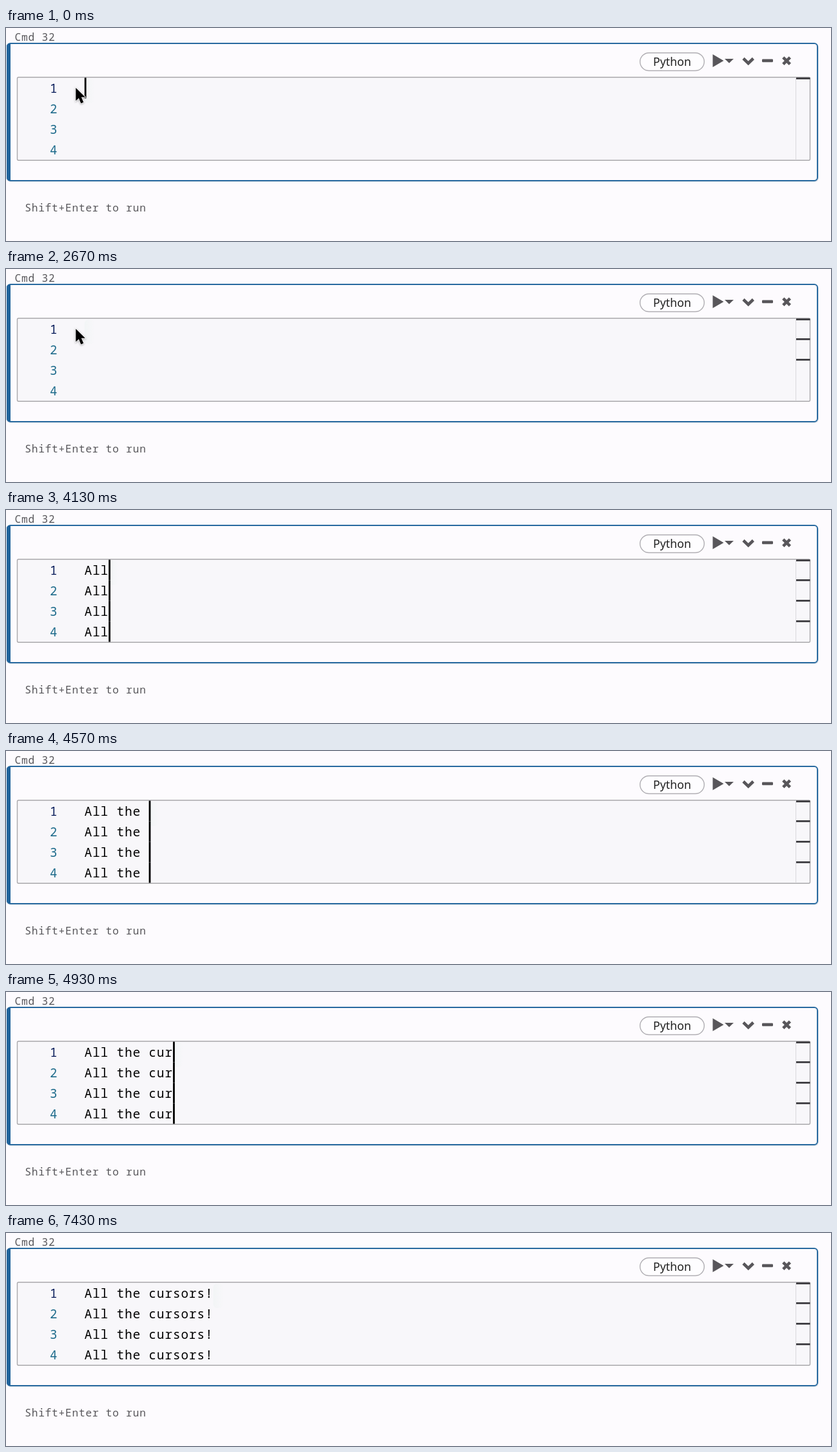
Recreate the animation shown at these times as an HTML page. Size 1280 by 332 pixels, loop 7860 ms.

```html
<!DOCTYPE html>
<html lang="en">
<head>
<meta charset="utf-8">
<title>Multiple cursors in a notebook cell</title>
<style>
  html, body { margin: 0; width: 100%; height: 100%; overflow: hidden; background: #fdfbfe; }
  svg { display: block; width: 100vw; height: 100vh; }
  text { white-space: pre; }
  .code { font: 19.2px "Noto Sans Mono", monospace; letter-spacing: .96px; }
  .note { font: 16.2px "Noto Sans Mono", monospace; letter-spacing: .76px; fill: #58575b; }
  .lang { font: 17.8px "Noto Sans", sans-serif; fill: #222; }
</style>
</head>
<body>
<svg viewBox="0 0 1280 332">
  <defs>
    <linearGradient id="haloFill">
      <stop offset="0" stop-color="#f2f5f6"/>
      <stop offset="1" stop-color="#f2f5f6" stop-opacity="0"/>
    </linearGradient>
    <g id="cube" fill="none" stroke="currentColor" stroke-width="1.1" stroke-linejoin="round">
      <path d="M8 1.4 14 4.4V11L8 14.6 2 11V4.4ZM2 4.4 8 7.6 14 4.4M8 7.6V14.6"/>
    </g>
    <g id="word" fill="none" stroke="currentColor" stroke-width="1.1">
      <path d="M.7 2.3H6M.7 6.2H9M10.7 6.2H13.4M.7 10H6M8 10H15.4M.7 13.5H11.5M9 1.6H14.5V3.6H9Z"/>
    </g>
    <path id="class" fill="currentColor" fill-rule="evenodd" d="M11.34 9.71h.71l2.67-2.67v-.71L13.38 5h-.7l-1.82 1.81h-5V5.56l1.86-1.85V3l-2-2H5L1 5v.71l2 2h.71l1.14-1.15v5.79l.5.5H10v.52l1.33 1.34h.71l2.67-2.67v-.71L13.37 10h-.7l-1.86 1.85h-5v-4H10v.48zm1.69-3.65.63.63-2 2-.63-.63zm0 5 .63.63-2 2-.63-.63zM3.35 6.65l-1.29-1.3 3.29-3.29 1.3 1.29z"/>
  </defs>

  <rect width="1280" height="332" fill="#fdfbfe"/>
  <text class="note" x="13.6" y="20">Cmd 32</text>
  <text class="note" x="29.2" y="286">Shift+Enter to run</text>

  <rect x="1" y="24.5" width="1260" height="215.5" rx="6" fill="#dfe3ea"/>
  <rect x="2" y="24" width="1257" height="214" rx="5" fill="#fdfbfe" stroke="#27699f" stroke-width="2"/>
  <path d="M7 24V238H6Q1 238 1 233V29Q1 24 6 24Z" fill="#1f639b"/>

  <rect x="983.7" y="38.7" width="99.6" height="27.8" rx="13.9" fill="#fefdff" stroke="#b0aeb3" stroke-width="1.4"/>
  <text class="lang" x="1033.5" y="58.8" text-anchor="middle">Python</text>
  <g fill="#58565a">
    <path d="M1096.5 41 1113.5 51 1096.5 61ZM1115 48H1129L1122 54.7Z"/>
    <rect x="1173" y="48.4" width="17" height="4.8" rx="1.2"/>
    <path d="M1144 47.5 1151.7 55 1159.4 47.5M1205.8 45.8 1216.4 56.4M1216.4 45.8 1205.8 56.4" fill="none" stroke="#58565a" stroke-width="4.6"/>
  </g>

  <rect x="17.5" y="76.8" width="1230" height="129.5" rx="2" fill="#f8f7fa" stroke="#a9a8ab" stroke-width="1.4"/>
  <path d="M1225.5 77.5V205.5" stroke="#d9d8dc"/>
  <rect id="halo" y="79" width="16" height="38" rx="6" fill="url(#haloFill)"/>
  <g id="lines"></g>
  <path id="pointer" transform="translate(108.3 93.2)" d="M0 0V20.2L4.6 16 8 24.2 12 22.5 8.6 14.6H14.6Z" stroke="#fff" stroke-width="1.6" paint-order="stroke" style="filter:drop-shadow(0 1.5px 1.5px #0005)"/>
  <g id="popup"></g>
</svg>
<script>
const LOOP = 7860, COL = 12.48, ROW = 32, LEFT = 121.8;
const PHRASE = "All the cursors!";
const keyTimes = [3830, 3970, 4070, 4200, 4300, 4400, 4480, 4570,
                  4670, 4800, 4900, 5070, 5170, 5270, 5430, 5900];
const cursorTimes = [0, 1600, 2170, 2770];
// Caret visibility flips at each of these times, starting visible.
const blinks = [330, 830, 1330, 1600, 2100, 2170, 2670, 2770, 3270, 3770, 6400, 6870, 7430];
const menuOpen = 4700, menuClose = 4870;
const menu = [["callable", "cube"], ["chr", "cube"], ["class", "word"], ["classmethod", "class"],
              ["compile", "cube"], ["complex", "class"], ["continue", "word"]];
const iconColors = { cube: "#4a4662", word: "#555", class: "#d07a08" };

const byId = id => document.getElementById(id);
const countUpTo = (times, t) => times.filter(at => at <= t).length;
const show = (el, on) => el.setAttribute("visibility", on ? "visible" : "hidden");

function add(parent, tag, attrs, text) {
  const el = document.createElementNS("http://www.w3.org/2000/svg", tag);
  for (const name in attrs) el.setAttribute(name, attrs[name]);
  if (text) el.textContent = text;
  return parent.appendChild(el);
}

const rows = cursorTimes.map((time, i) => {
  const g = byId("lines"), top = 77.5 + i * ROW, y = 101 + i * ROW;
  add(g, "text", { class: "code", x: 68, y, fill: i ? "#1f6c8c" : "#0b1f5c" }, String(i + 1));
  return {
    text: add(g, "text", { class: "code", x: LEFT, y, fill: "#000" }),
    caret: add(g, "rect", { y: top, width: 2.8, height: i < 3 ? ROW : ROW - 4 + 4.2 - .2 }),
    mark: add(g, "rect", { x: 1226, y: i ? 76 + i * ROW : 77.2, width: 21.5, height: 2.8, fill: "#3d3c40" })
  };
});

const popup = byId("popup");
add(popup, "rect", { x: 234, y: 110.5, width: 683, height: 240, fill: "#efeef1", stroke: "#bfbec3" });
add(popup, "rect", { x: 234.5, y: 111, width: 682, height: 32, fill: "#0052b5" });
menu.forEach(([name, icon], i) => {
  const y = 134 + i * ROW;
  const label = add(popup, "text", { class: "code", x: 269.8, y, fill: i ? "#000" : "#fff" });
  add(label, "tspan", { "font-weight": 700, fill: i ? "#0058b8" : "#a5d3ff" }, name[0]);
  add(label, "tspan", {}, name.slice(1));
  add(popup, "use", {
    href: "#" + icon,
    color: i ? iconColors[icon] : "#fff",
    transform: `translate(238.3 ${y - 19.4}) scale(1.5)`
  });
});

function draw(t) {
  const typed = countUpTo(keyTimes, t);
  const cursors = countUpTo(cursorTimes, t);
  const lit = countUpTo(blinks, t) % 2 === 0;
  const x = LEFT + typed * COL;
  rows.forEach((row, i) => {
    row.text.textContent = PHRASE.slice(0, typed);
    row.caret.setAttribute("x", x);
    show(row.caret, lit && i < cursors);
    show(row.mark, i < cursors);
  });
  byId("halo").setAttribute("x", x);
  show(byId("pointer"), typed === 0);
  show(popup, t >= menuOpen && t < menuClose);
}

const start = performance.now();
function tick(now) {
  draw(Math.max(0, now - start) % LOOP);
  requestAnimationFrame(tick);
}
draw(0);
requestAnimationFrame(tick);
</script>
</body>
</html>
```
